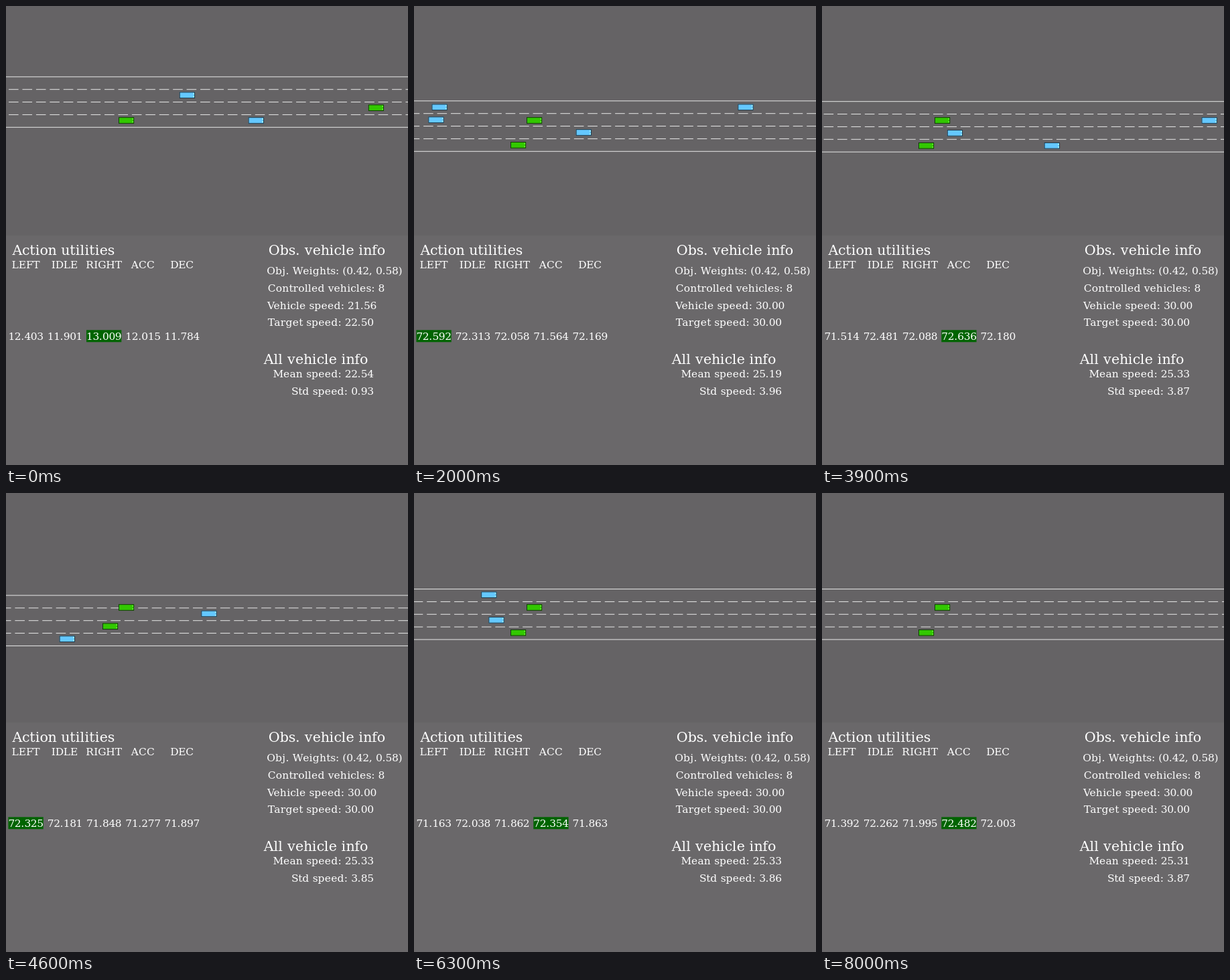
Write an HTML page that moves like this. It is 600 by 686 pixels and loops after 8.1 s.

```html
<!DOCTYPE html>
<html lang="en">
<head>
<meta charset="utf-8">
<title>Highway driving agents</title>
<style>
  html, body { margin: 0; width: 100%; height: 100%; overflow: hidden; background: #6a686a; }
  svg { display: block; width: 600px; height: 686px; }
  text { font-family: "DejaVu Serif", serif; fill: #fff; white-space: pre; }
</style>
</head>
<body>
<svg id="stage" viewBox="0 0 700 800.333">
  <rect width="700" height="800.4" fill="#6a686a"/>
  <rect width="700" height="400" fill="#656365"/>
</svg>
<script>
const stage = document.getElementById('stage');
const pen = document.createElement('canvas').getContext('2d');
const STEPS = 81, STEP_MS = 100, UNIT = 7 / 6;
const METER = 5.5, LANE = 22, PERIOD = 13 / 3 * METER, DASH = 17;
const BLUE = ['#64c8ff', '#b4ffff'], GREEN = ['#32c800', '#6fff40'];

const wrap = (x, p) => ((x % p) + p) % p;
const noise = k => wrap(Math.sin(k * 12.9898) * 43758.5453, 1);

function add(tag, attrs, parent = stage) {
  const el = document.createElementNS('http://www.w3.org/2000/svg', tag);
  for (const k in attrs) el.setAttribute(k, attrs[k]);
  parent.appendChild(el);
  return el;
}

// Text sits on whole-pixel advances and kerning
function layout(str, size) {
  pen.font = size + 'px "DejaVu Serif", serif';
  const w = s => pen.measureText(s).width;
  let x = 0;
  const xs = [...str].map((ch, i) => {
    if (i) x += Math.round(w(str[i - 1] + ch) - w(str[i - 1]) - w(ch));
    const at = x;
    x += Math.round(w(ch));
    return at;
  });
  return { xs, width: x };
}
function write(el, str) {
  if (el.textContent === str) return;
  el.setAttribute('x', layout(str, el.size).xs.map(x => x + el.left).join(' '));
  el.textContent = str;
}
function label(left, y, str, size = 18) {
  const el = add('text', { y, 'font-size': size });
  Object.assign(el, { left, size });
  write(el, str);
  return el;
}

// Speed of the observed vehicle: 21.56 rising to 30
const GAIN = 8.44;
const lag = n => Math.exp(-((n / 3.4513) ** 2));
const speed = n => 30 - GAIN * lag(n);
const targetSpeed = n => Math.min(30, Math.ceil(speed(n) / 2.5) * 2.5);

// lost[n]: steps of full-speed progress still missing at step n
const lost = Array(STEPS).fill(0);
for (let n = STEPS - 2; n >= 0; n--) lost[n] = lost[n + 1] + lag(n + 1);
const progress = n => n + lost[n];
const dashStart = n => wrap(4.33 + 1.8 * n - lost[n] * GAIN * METER, PERIOD);

// Lane changes: [step, direction]
const ease = k => k > 0 ? 1 - Math.exp(-0.7 * k * k) : 0;
const steer = (lane, turns) => n => turns.reduce((l, [at, dir]) => l + dir * ease(n - at), lane);
const turns = [[5, -1], [18, -1], [29, 1], [36, -1], [45, -1], [58, 1]];
const egoLane = steer(3, turns);
const mateLane = steer(2, [[7, 1], [40, -1], [58, 1]]);

// Slower traffic, seen at x on a given step and falling back by rate
const slow = (at, x, lane, rate = 36) => ({
  paint: BLUE, lane: () => lane,
  x: n => x - rate * (progress(n) - progress(at))
});
const cars = [
  slow(0, 270, 1), slow(0, 373, 3),
  slow(20, 38, 0), slow(20, 33, 1), slow(20, 253, 2), slow(20, 495, 0),
  slow(31, 228, 1), slow(31, 440, 2, 30.25),
  slow(39, 343, 3), slow(39, 578, 1, 39.3),
  slow(52, 508, 0), slow(52, 586, 2, 42.1),
  { paint: GREEN, lane: mateLane, x: n => 155.3 + 397 * Math.exp(-((n / 7) ** 2)) },
  { paint: GREEN, lane: egoLane, x: () => 179.4 }
];

const lines = [0, 1, 2, 3, 4].map(i => add('path', {
  stroke: '#fff',
  'stroke-dasharray': i % 4 ? DASH + ' ' + (PERIOD - DASH) : 'none'
}));
for (const car of cars) {
  const [body, lamp] = car.paint;
  car.el = add('g', {});
  add('rect', { width: 27, height: 11, fill: body }, car.el);
  for (const y of [2, 7]) add('rect', { x: 24, y, width: 2, height: 2, fill: lamp }, car.el);
  add('rect', { x: 0.5, y: 0.5, width: 26, height: 10, fill: 'none', stroke: '#000', opacity: 0.8 }, car.el);
}

// Panel
const names = ['LEFT', 'IDLE', 'RIGHT', 'ACC', 'DEC'];
const column = i => 4 + 68 * i;
const row = i => 468 + 30 * i;
const mark = add('rect', { y: 565, width: 61, height: 21, fill: '#006400' });
label(11, 434, 'Action utilities', 24);
names.forEach((s, i) => label(column(i) + Math.floor((61 - layout(s, 18).width) / 2), 457, s));
const utilEls = names.map((s, i) => label(column(i), 582, ''));
label(457, 434, 'Obs. vehicle info', 24);
label(454, row(0), 'Obj. Weights: (0.42, 0.58)');
label(456, row(1), 'Controlled vehicles: 8');
const speedEl = label(455, row(2), '');
const targetEl = label(456, row(3), '');
label(449, 624, 'All vehicle info', 24);
const meanEl = label(465, row(6), '');
const stdEl = label(497, row(7), '');

const firstUtil = [12.403, 11.901, 13.009, 12.015, 11.784];
const cruiseUtil = [71.392, 72.262, 71.995, 72.482, 72.003];
function utilities(n) {
  const swing = Math.sin(Math.PI * n / (STEPS - 1));
  const u = firstUtil.map((a, i) => a + (cruiseUtil[i] - a) * (1 - lag(n))
    + swing * (0.6 * noise(n) - 0.3 + 0.2 * noise(n * 5 + i + 1) - 0.1));
  const turn = turns.find(([at]) => n > at && n < at + 3);
  if (turn) {
    const pick = turn[1] < 0 ? 0 : 2, best = u.indexOf(Math.max(...u));
    [u[pick], u[best]] = [u[best], u[pick]];
  }
  return u;
}
const mean = n => 25.337 - 3.5e-5 * (n - 52) ** 2 - 2.702 * Math.exp(-n / 6.27);
const std = n => Math.max(4.05 - 0.0045 * n, 3.85 + 0.0007 * (n - 52)) - 3.12 * Math.exp(-n / 2.5);

function draw(n) {
  const lane = egoLane(n);
  lines.forEach((el, i) => {
    const y = Math.floor(200 + LANE * (i - 0.5 - lane)) + 0.5;
    const x = i % 4 ? dashStart(n) - PERIOD : 0;
    el.setAttribute('d', `M${x} ${y}H720`);
  });
  for (const car of cars) {
    const left = Math.round(car.x(n) * UNIT - 13.5);
    const top = Math.floor(194.5 + LANE * (car.lane(n) - lane));
    car.el.setAttribute('transform', `translate(${left} ${top})`);
  }
  const u = utilities(n);
  u.forEach((v, i) => write(utilEls[i], v.toFixed(3)));
  mark.setAttribute('x', column(u.indexOf(Math.max(...u))));
  write(speedEl, 'Vehicle speed: ' + speed(n).toFixed(2));
  write(targetEl, 'Target speed: ' + targetSpeed(n).toFixed(2));
  write(meanEl, 'Mean speed: ' + mean(n).toFixed(2));
  write(stdEl, 'Std speed: ' + std(n).toFixed(2));
}

let shown = -1;
const start = performance.now();
function tick() {
  const n = Math.floor((performance.now() - start) / STEP_MS) % STEPS;
  if (n !== shown) draw(shown = n);
  requestAnimationFrame(tick);
}
tick();
</script>
</body>
</html>
```
